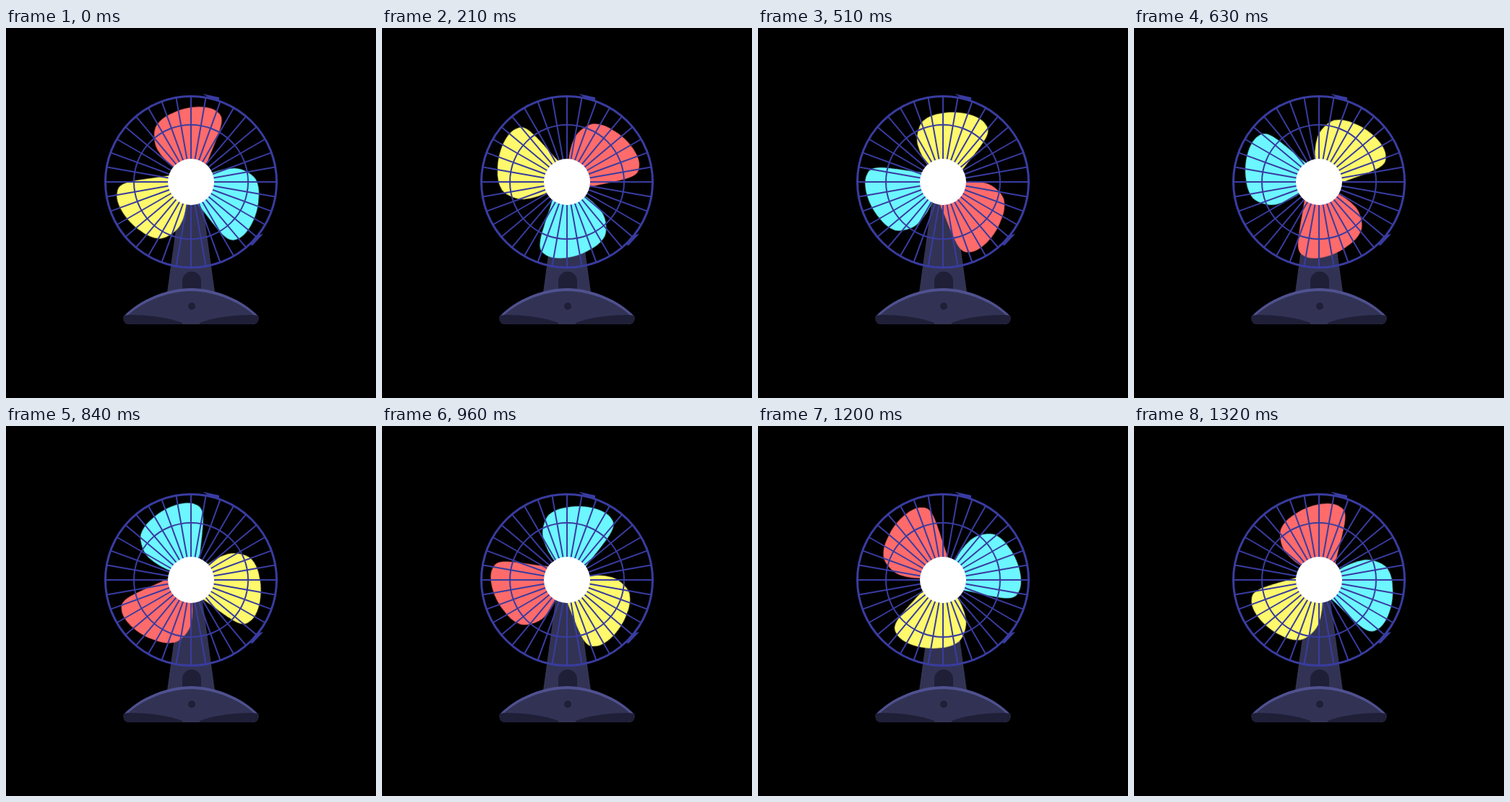
Animation of 512 by 512 pixels, one loop 1350 ms. Source, as an HTML page:

```html
<!DOCTYPE html>
<html lang="en">
<head>
<meta charset="utf-8">
<title>Desk fan</title>
<style>
  html, body { margin: 0; width: 100%; height: 100%; overflow: hidden; background: #000; }
  svg { display: block; width: 100%; height: 100%; }
  .drift { animation: drift 1350ms steps(45) infinite; }
  .spin { transform-origin: 0 0; animation: spin 1350ms steps(45) infinite; }
  @keyframes drift {
    from { transform: translate(252.3px, 212.7px); }
    to { transform: translate(258.3px, 212.7px); }
  }
  @keyframes spin { to { transform: rotate(360deg); } }
  .body { fill: #323354; }
  .dark { fill: #1f1f38; }
  .rim { fill: #4f5190; }
  .cage { fill: none; stroke: #393ca0; stroke-width: 2; }
  .mark { fill: #393ca0; }
</style>
</head>
<body>
<svg viewBox="0 0 512 512">
  <defs>
    <path id="blade" d="M-15-12Q-37-28-46-43.6Q-50.3-52-50.3-62C-50.3-70-49-73-47.7-76.4C-42-85-35-90-25.5-94C-14-100 0-103 12-103C24-103 33-100 37-96C42-92 43.2-89 43.2-84C43-75 37-60 25-31L18-12Z"/>
    <path id="shade" d="M162 401Q162 397 172 397C202 397 225 401 244 408V410H172Q162 410 162 401Z"/>
    <path id="dome" d="M163 399C185 375 225 360 256 360S327 375 349 399Q351 410 340 410H172Q161 410 163 399Z"/>
    <clipPath id="base"><use href="#dome"/></clipPath>
  </defs>

  <path class="body" d="M241 235H271L289 366H223Z"/>
  <path class="dark" d="M244 366V350A13 13 0 0 1 270 350V366Z"/>
  <use href="#dome" class="rim"/>
  <g clip-path="url(#base)">
    <use href="#dome" class="body" y="4"/>
    <path class="body" d="M172 400H340V410H172Z"/>
    <path class="dark" d="M240 407L244 408V410H240Z"/>
  </g>
  <use href="#shade" class="dark"/>
  <use href="#shade" class="dark" transform="matrix(-1 0 0 1 512 0)"/>
  <circle class="dark" cx="257" cy="385" r="5"/>

  <g class="drift">
    <g class="spin">
      <!-- the blades sit slightly off their pivot -->
      <g transform="translate(3.1 -.8)">
        <use href="#blade" fill="#ff6b6b"/>
        <use href="#blade" fill="#6cf6ff" transform="rotate(120)"/>
        <use href="#blade" fill="#fff96b" transform="rotate(240)"/>
      </g>
    </g>
  </g>

  <g class="cage" transform="translate(256 213)">
    <path id="spokes"/>
    <circle r="79"/>
    <circle r="118.5" stroke-width="3" style="stroke-width:3"/>
  </g>
  <path class="mark" d="M272 91L295 96V100L282 97ZM356 285L346 287L338 300L341 301Z"/>
  <circle cx="256" cy="213" r="32" fill="#fff"/>
</svg>
<script>
  let d = '';
  for (let deg = 0; deg < 360; deg += 10) {
    const a = deg * Math.PI / 180;
    const at = r => `${r * Math.cos(a)} ${r * Math.sin(a)}`;
    d += `M${at(30)}L${at(118)}`;
  }
  document.getElementById('spokes').setAttribute('d', d);
</script>
</body>
</html>
```
